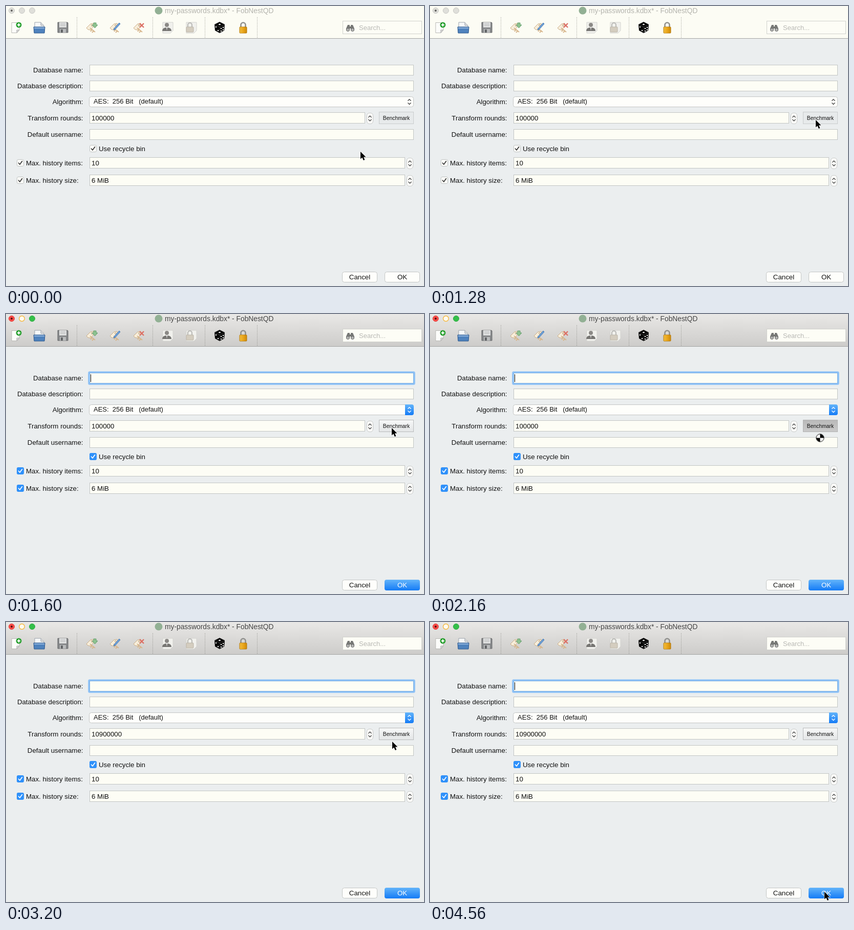
An HTML page that plays this animation: 816 by 548 pixels, repeating every 6.56 s.

```html
<!DOCTYPE html>
<html lang="en">
<head>
<meta charset="utf-8">
<title>Database settings</title>
<style>
  html, body { margin: 0; width: 100%; height: 100%; overflow: hidden; background: #ebeeef; }
  svg { display: block; width: 816px; height: 548px; }
  text { font: 13.3px "Liberation Sans", Arial, sans-serif; fill: #111; }
  .end { text-anchor: end; }
  .mid { text-anchor: middle; }
  .title { font-size: 13.8px; }
  .small { font-size: 10.35px; }
  .field { fill: #fdfdf5; stroke: #c2c5c4; }
  .btn { fill: #fefefb; stroke: #c3c5c5; }
  .chev { fill: none; stroke: #444; stroke-width: 1.3; stroke-linecap: round; stroke-linejoin: round; }
  .tick { fill: none; stroke: #333; stroke-width: 1.7; stroke-linecap: round; stroke-linejoin: round; }
  .white { stroke: #fff; }
  .sep { stroke: #85857f; stroke-dasharray: 1 2; }

  /* every track shares one 6.56 s clock */
  .win, .active, .press, .caret, .before, .after, .arrow, .ball, .pointer {
    animation: 6.56s step-end infinite;
  }
  .win { animation-name: win; }
  .active { animation-name: active; }
  .press { animation-name: press; }
  .caret { animation-name: caret; }
  .before { animation-name: before; }
  .after { animation-name: after; }
  .arrow { animation-name: arrow; }
  .ball { animation-name: ball; }
  .pointer { animation-name: pointer; }

  @keyframes win { 0% { opacity: 0 } 20.73%, 100% { opacity: 1 } }
  @keyframes active { 0% { opacity: 0 } 21.95%, 100% { opacity: 1 } }
  @keyframes press { 0%, 45.12%, 100% { opacity: 0 } 26.82% { opacity: 1 } }
  @keyframes before { 0% { opacity: 1 } 45.12%, 100% { opacity: 0 } }
  @keyframes after { 0% { opacity: 0 } 45.12%, 100% { opacity: 1 } }
  @keyframes arrow { 0%, 45.12%, 100% { opacity: 1 } 32.92% { opacity: 0 } }
  @keyframes ball { 0%, 45.12%, 100% { opacity: 0 } 32.92% { opacity: 1 } }
  @keyframes caret {
    0%, 39.02%, 57.31% { opacity: 0 }
    21.95%, 51.21%, 64.63%, 100% { opacity: 1 }
  }
  @keyframes pointer {
    0% { transform: translate(692px, 285px) }
    1.21% { transform: translate(693px, 284px) }
    2.43% { transform: translate(697px, 280px) }
    3.65% { transform: translate(706px, 273px) }
    4.87% { transform: translate(718px, 264px) }
    6.09% { transform: translate(731px, 256px) }
    7.31% { transform: translate(742px, 250px) }
    8.53% { transform: translate(750px, 245px) }
    9.75% { transform: translate(754px, 242px) }
    10.97% { transform: translate(755px, 239px) }
    12.19% { transform: translate(755px, 235px) }
    13.41% { transform: translate(754px, 230px) }
    14.63% { transform: translate(753px, 225px) }
    15.85% { transform: translate(753px, 223px) }
    30.48% { transform: translate(753px, 226px) }
    31.7% { transform: translate(753px, 231px) }
    32.92% { transform: translate(754px, 234px) }
    64.63% { transform: translate(754px, 241px) }
    65.85% { transform: translate(757px, 291px) }
    67.07% { transform: translate(762px, 400px) }
    68.29% { transform: translate(767px, 490px) }
    69.51%, 100% { transform: translate(770px, 528px) }
  }
</style>
</head>
<body>
<svg viewBox="0 0 816 548">
  <defs>
    <linearGradient id="bar" x2="0" y2="1"><stop stop-color="#e9e8e6"/><stop offset="1" stop-color="#cdccca"/></linearGradient>
    <linearGradient id="blue" x2="0" y2="1"><stop stop-color="#63b4fa"/><stop offset="1" stop-color="#147bf6"/></linearGradient>
    <linearGradient id="grey" x2="0" y2="1"><stop stop-color="#f7f8f8"/><stop offset="1" stop-color="#e4e6e7"/></linearGradient>
    <linearGradient id="down" x2="0" y2="1"><stop stop-color="#b9b9b9"/><stop offset="1" stop-color="#cacaca"/></linearGradient>
    <linearGradient id="gold"><stop stop-color="#f8c64a"/><stop offset=".5" stop-color="#f0ab1c"/><stop offset="1" stop-color="#c98508"/></linearGradient>
    <path id="check" d="M3.5 7.2 6 10 10.5 3.8"/>
    <path id="chevs" d="M-2.7-2.3 0-5 2.7-2.3M-2.7 2.3 0 5 2.7 2.3"/>
    <g id="box"><rect x=".5" y=".5" width="13" height="13" rx="2.5" fill="#fefefa" stroke="#bfc2c2"/><use href="#check" class="tick"/></g>
    <g id="boxOn"><rect width="14" height="14" rx="3" fill="#2f91fa"/><use href="#check" class="tick white"/></g>
    <g id="stepper"><rect x=".5" y=".5" width="12" height="21" rx="5" class="btn"/><use href="#chevs" x="6.5" y="11" class="chev"/></g>
    <g id="key" stroke-linejoin="round">
      <path d="M-10 1-2-7 4-8 5-3-2 5-7 4Z" fill="#f7eedb" stroke="#c9ab82"/>
      <path d="M-3 1 7 9M1 4-2 8M4 7 1 10" fill="none" stroke="#d7b58a" stroke-width="2"/>
      <circle cx="1" cy="-4" r="1.5" fill="#fff" stroke="#bd9b70"/>
    </g>
    <path id="sheet" d="M-9-10H11V6L6 11H-9Z" fill="#f1f1ed" stroke="#d2d2ce"/>
  </defs>

  <rect width="816" height="548" fill="#ebeeef"/>

  <!-- title bar, inactive then active -->
  <rect width="816" height="63" fill="#fcfcf4"/>
  <g fill="#dfdfda" stroke="#c9c9c5">
    <circle cx="11" cy="9" r="5.5"/><circle cx="31" cy="9" r="5.5"/><circle cx="51" cy="9" r="5.5"/>
  </g>
  <circle cx="11" cy="9" r="2" fill="#62625f"/>
  <text class="title" x="310" y="14" style="fill:#b4b4ae">my-passwords.kdbx* - FobNestQD</text>
  <g class="win">
    <rect width="816" height="63" fill="url(#bar)"/>
    <circle cx="11" cy="9" r="5.5" fill="#fb4c48" stroke="#e0413d"/>
    <circle cx="11" cy="9" r="2" fill="#57100d"/>
    <circle cx="31" cy="9" r="5.3" fill="#fdfaf0" stroke="#f5b637" stroke-width="1.4"/>
    <circle cx="51" cy="9" r="5.5" fill="#35bf4a" stroke="#2dac40"/>
    <text class="title" x="310" y="14" style="fill:#454545">my-passwords.kdbx* - FobNestQD</text>
  </g>
  <circle cx="298" cy="9" r="7.5" fill="#92b094"/>
  <path d="M0 63.5H816" stroke="#a3a4a3"/>

  <!-- toolbar -->
  <path class="sep" d="M138.5 22V62M286.5 22V62M388.5 22V62M490.5 22V62"/>
  <g transform="translate(20 42)">
    <path d="M-9-9.5H6V5L1 10.5H-9Z" fill="#fcfcfa" stroke="#b9b9b5"/>
    <path d="M1 10.5V5H6Z" fill="#ddd" stroke="#aaa"/>
    <circle cx="5" cy="-5" r="5.5" fill="#2fa336"/>
    <path d="M5-8V-2M2-5H8" stroke="#fff" stroke-width="2"/>
  </g>
  <g transform="translate(65 42)">
    <path d="M-9 2V-10H3L9-4V2Z" fill="#f7f8f8" stroke="#9aa3ac"/>
    <path d="M3-10V-4H9" fill="#ddd" stroke="#9aa3ac"/>
    <path d="M-11-1H11L10 11H-10Z" fill="#4f82bd" stroke="#2b568c"/>
    <path d="M-10 1H10" stroke="#8fb4de" stroke-width="2"/>
  </g>
  <g transform="translate(111 42)">
    <path d="M-10-10H9L10-9V10H-10Z" fill="#858789" stroke="#66686a"/>
    <rect x="-7" y="-10" width="14" height="10" fill="#dfe0e0"/>
    <path d="M-5-7H5M-5-4H5" stroke="#b3b5b6"/>
    <rect x="-6" y="3" width="12" height="7" fill="#b9bbbc"/>
    <rect x="-4" y="4" width="4" height="6" fill="#626466"/>
  </g>
  <g transform="translate(167 42)">
    <use href="#key"/>
    <path d="M4-9H9V-5H12L6.500 1 1-5H4Z" fill="#8ec391" stroke="#5f9c66"/>
  </g>
  <g transform="translate(213 42)">
    <use href="#key"/>
    <path d="M8-9 10-7 0 4-3 5-2 2Z" fill="#6fa3dc" stroke="#3f73ae"/>
  </g>
  <g transform="translate(259 42)">
    <use href="#key"/>
    <path d="M2-8 10 0M10-8 2 0" stroke="#dc6d62" stroke-width="2.4"/>
  </g>
  <g transform="translate(315 42)">
    <use href="#sheet"/>
    <circle cx="-1" cy="-5" r="4" fill="#8b8986"/>
    <path d="M-10 7Q-10 0-1 0T8 7Z" fill="#777673"/>
    <path d="M-2 0-1 6 0 0Z" fill="#eee"/>
  </g>
  <g transform="translate(361 42)">
    <use href="#sheet"/>
    <path d="M-6-1V-5A4 4 0 0 1 2-5V-1" fill="none" stroke="#b9b9b6" stroke-width="2"/>
    <rect x="-9" y="-1" width="14" height="10" rx="1" fill="#d4cdbf" stroke="#bbb5a8"/>
  </g>
  <g transform="translate(417 42)">
    <path d="M0-11 10-6 9 6 0 11-9 6-10-6Z" fill="#050505"/>
    <path d="M-10-6 0-1 10-6M0-1V11" fill="none" stroke="#444" stroke-width=".8"/>
    <g fill="#fff">
      <ellipse cy="-6" rx="2" ry="1.2"/>
      <circle cx="-7" cy="-1" r="1.2"/><circle cx="-3" cy="6" r="1.2"/>
      <circle cx="3" cy="2" r="1.2"/><circle cx="7" cy="0" r="1.2"/><circle cx="3" cy="7" r="1.2"/><circle cx="7" cy="4.500" r="1.2"/>
    </g>
  </g>
  <g transform="translate(463 42)">
    <path d="M-4.500 0V-5A4.500 4.500 0 0 1 4.500-5V0" fill="none" stroke="#8f8f8c" stroke-width="2.600"/>
    <rect x="-7" y="-1" width="14" height="12" rx="1" fill="url(#gold)" stroke="#b67a0a"/>
    <path d="M-6 3H6M-6 7H6" stroke="#d99a1b"/>
  </g>
  <rect x="657.5" y="29.5" width="154" height="25" fill="#fdfdf6" stroke="#d0d1cd"/>
  <g transform="translate(672 43)" fill="#777876">
    <path d="M-5-6H-1V5H-8V1ZM5-6H1V5H8V1Z"/>
    <rect x="-2" y="-3" width="4" height="4"/>
    <circle cx="-4.500" cy="3.500" r="3" fill="#b5b6b4" stroke="#666"/><circle cx="4.500" cy="3.500" r="3" fill="#b5b6b4" stroke="#666"/>
  </g>
  <text x="689" y="47" style="fill:#b8b8b4;font-size:13px">Search...</text>

  <!-- labels -->
  <g class="end">
    <text x="150.500" y="130">Database name:</text>
    <text x="150.500" y="161">Database description:</text>
    <text x="150.500" y="192">Algorithm:</text>
    <text x="150.500" y="224">Transform rounds:</text>
    <text x="150.500" y="256">Default username:</text>
  </g>
  <text x="181" y="284">Use recycle bin</text>
  <text x="39" y="312">Max. history items:</text>
  <text x="39" y="346">Max. history size:</text>

  <!-- fields -->
  <g class="field">
    <rect x="163.500" y="115.500" width="632" height="20"/>
    <rect x="163.500" y="146.500" width="632" height="20"/>
    <rect x="163.500" y="208.500" width="537" height="21"/>
    <rect x="163.500" y="241.500" width="632" height="20"/>
    <rect x="163.500" y="296.500" width="615" height="21"/>
    <rect x="163.500" y="330.500" width="615" height="21"/>
  </g>
  <rect class="btn" x="162.500" y="177.500" width="633" height="20" rx="4"/>
  <use href="#chevs" x="787.500" y="187.500" class="chev"/>
  <text x="171" y="191" style="font-size:13px">AES:&nbsp; 256 Bit&nbsp;&nbsp; (default)</text>
  <use href="#stepper" x="704" y="209"/>
  <use href="#stepper" x="782" y="297"/>
  <use href="#stepper" x="782" y="331"/>
  <text class="before" x="167" y="224">100000</text>
  <text class="after" x="167" y="224">10900000</text>
  <text x="167" y="312">10</text>
  <text x="167" y="346">6 MiB</text>
  <use href="#box" x="163" y="272"/>
  <use href="#box" x="21" y="300"/>
  <use href="#box" x="21" y="334"/>

  <!-- buttons -->
  <rect x="728.500" y="207.500" width="67" height="23" fill="#e7eaeb" stroke="#c9cccd"/>
  <rect class="btn" x="656.500" y="520.500" width="68" height="20" rx="4"/>
  <rect class="btn" x="739.500" y="520.500" width="68" height="20" rx="4"/>
  <text class="mid" x="690.500" y="535">Cancel</text>
  <text class="mid" x="773.500" y="535">OK</text>

  <!-- focused window accents -->
  <g class="active">
    <rect x="162" y="114" width="635" height="23" rx="1.500" fill="none" stroke="#8fc2f6" stroke-width="3.600"/>
    <rect x="163.500" y="115.500" width="632" height="20" fill="none" stroke="#76ace4"/>
    <path d="M779 177H792A4 4 0 0 1 796 181V194A4 4 0 0 1 792 198H779Z" fill="url(#blue)"/>
    <use href="#chevs" x="787.500" y="187.500" class="chev white"/>
    <use href="#boxOn" x="163" y="272"/>
    <use href="#boxOn" x="21" y="300"/>
    <use href="#boxOn" x="21" y="334"/>
    <rect x="728.500" y="207.500" width="67" height="23" fill="url(#grey)" stroke="#b9bbbc"/>
    <rect x="739" y="520" width="69" height="21" rx="4" fill="url(#blue)"/>
    <text class="mid" x="773.500" y="535" style="fill:#fff">OK</text>
  </g>
  <rect class="press" x="728.500" y="207.500" width="67" height="23" fill="url(#down)" stroke="#b2b2b2"/>
  <text class="mid small" x="762" y="223">Benchmark</text>
  <path class="caret" d="M165.500 118V133" stroke="#000"/>

  <!-- pointer -->
  <g class="pointer">
    <path class="arrow" d="M0 0V14.500L3.300 11.500 5.800 17 8.400 15.900 6 10.500H10.500Z" fill="#000" stroke="#fff" stroke-width="1.200" paint-order="stroke"/>
    <g class="ball" transform="translate(7.500 8.500)">
      <circle r="7.500" fill="#fff" stroke="#000"/>
      <path d="M0 0V-7.500A7.500 7.500 0 0 1 7.500 0H-7.500A7.500 7.500 0 0 0 0 7.500Z" fill="#000"/>
    </g>
  </g>
</svg>
</body>
</html>
```
